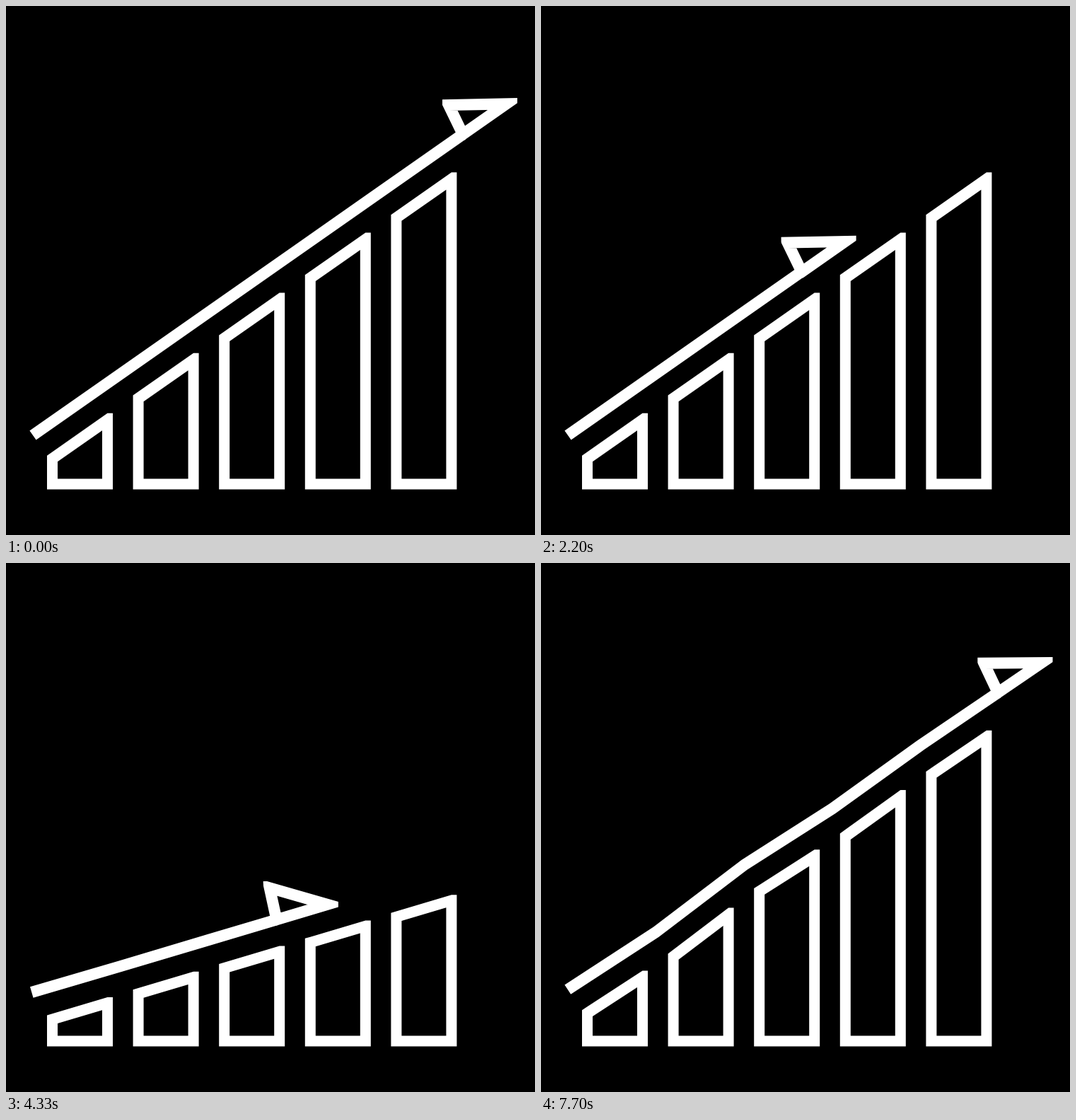
These frames come from a looping animation (748x748 px, 7.73 s). An HTML page with a canvas:

```html
<!DOCTYPE html>
<html lang="en">
<head>
<meta charset="utf-8">
<title>Growth chart</title>
<style>
  html, body { margin: 0; width: 100%; height: 100%; overflow: hidden; background: #000; }
  canvas { display: block; }
</style>
</head>
<body>
<canvas width="748" height="748"></canvas>
<script>
const ctx = document.querySelector('canvas').getContext('2d');
const CYCLE = 3865;

// Trend line: x of its corners, and the heights of its three shapes
const xs = [38, 162, 288, 412, 536, 646];
const straight = xs.map(x => 607 - 0.7 * (x - 38));
const steep = [600, 495, 455, 325, 265, 132];
const jagged = [544, 554, 342, 379.5, 254.5, 212];

const progress = (t, from, to) => Math.min(1, Math.max(0, (t - from) / (to - from)));
const easeIn = u => u * u;
const easeInOut = u => u < 0.5 ? 2 * u * u : 1 - 2 * (1 - u) ** 2;
const mix = (a, b, u) => a.map((v, i) => v + (b[i] - v) * u);

// Share of full height: falls, rests almost flat, then springs up
function riseAt(t) {
  if (t < 865) return 1 - easeInOut(progress(t, 0, 865));
  return 0.02 * progress(t, 865, 1250) + 0.98 * easeInOut(progress(t, 1250, 1650));
}

// Share of the line that is withdrawn
function withdrawnAt(t) {
  return t < 1655 ? easeIn(progress(t, 0, 707)) : 1 - easeIn(progress(t, 1660, 2395));
}

function lineAt(t) {
  if (t < 2640) return straight.map(y => 607 - (607 - y) * riseAt(t));
  if (t < 3065) return mix(straight, steep, easeInOut(progress(t, 2640, 2810)));
  if (t < 3605) return mix(steep, jagged, easeInOut(progress(t, 3065, 3605)));
  return mix(jagged, straight, easeInOut(progress(t, 3605, 3885)));
}

const segment = x => Math.max(0, xs.findLastIndex((v, i) => v <= x && i < 5));
const slope = (ys, i) => (ys[i + 1] - ys[i]) / (xs[i + 1] - xs[i]);
const heightAt = (ys, x, i) => ys[i] + slope(ys, i) * (x - xs[i]);

function trace(points) {
  points.forEach(([x, y], i) => i ? ctx.lineTo(x, y) : ctx.moveTo(x, y));
}

// The top edge follows the line; its upper corner is cut level
function drawBar(ys, i) {
  const half = 7.5, left = 65.5 + 121.6 * i, right = left + 78;
  const s = slope(ys, i);
  const gap = Math.hypot(45, 38 * s);
  const thick = Math.hypot(half, 8.5 * s);
  const top = x => heightAt(ys, x, i) + gap;
  const outer = x => top(x) - thick;
  ctx.beginPath();
  trace([
    [left - half, 676 + half],
    [left - half, Math.max(outer(left - half), outer(left))],
    [left, outer(left)],
    [right, outer(right)],
    [right + half, Math.max(outer(right + half), outer(right))],
    [right + half, 676 + half]
  ]);
  ctx.closePath();
  trace([
    [left + half, 676 - half],
    [left + half, top(left + half) + thick],
    [right - half, top(right - half) + thick],
    [right - half, 676 - half]
  ]);
  ctx.closePath();
  ctx.fill('evenodd');
}

// Triangle whose back edge turns less than its base; sharp ends are cut square
function drawHead(x, y, angle) {
  const back = 0.74 * angle;
  const apex = [x + 46 * Math.sin(back), y - 46 * Math.cos(back)];
  const tip = [x + 75 * Math.cos(angle), y + 75 * Math.sin(angle)];
  const minX = Math.min(x, apex[0]) - 9;
  const minY = Math.min(apex[1], tip[1]) - 9.5;
  const maxY = Math.max(y, tip[1]) + 8.5;
  ctx.save();
  ctx.beginPath();
  ctx.rect(minX, minY, tip[0] + 15.5 - minX, maxY - minY);
  ctx.clip();
  ctx.beginPath();
  trace([[x, y], apex, tip]);
  ctx.closePath();
  ctx.stroke();
  ctx.restore();
}

function drawArrow(ys, withdrawn, rise) {
  const home = 38.5 + 2.3 * rise;
  const endX = 646 + (home - 646) * withdrawn;
  const last = segment(endX);
  const endY = heightAt(ys, endX, last);
  ctx.lineWidth = 16;

  if (withdrawn < 1) {
    const startX = 35 + 3 * Math.min(1, Math.max(0, -slope(ys, 0) / 0.7));
    const corners = xs.slice(1, last + 1).map((x, i) => [x, ys[i + 1]]);
    ctx.beginPath();
    trace([[startX, ys[0]], ...corners, [endX, endY]]);
    ctx.stroke();
  }

  // Near the start the head rides up when flat and down when tilted
  const shift = (9 * rise - 4.5) * withdrawn ** 3;
  drawHead(endX, endY + shift, Math.atan(slope(ys, last)));
}

function draw(now) {
  const t = now % CYCLE;
  const ys = lineAt(t);
  ctx.fillStyle = '#000';
  ctx.fillRect(0, 0, 748, 748);
  ctx.fillStyle = ctx.strokeStyle = '#fff';
  for (let i = 0; i < 5; i++) drawBar(ys, i);
  drawArrow(ys, withdrawnAt(t), riseAt(t));
}

const begin = performance.now();
function tick() {
  draw(performance.now() - begin);
  requestAnimationFrame(tick);
}
tick();
</script>
</body>
</html>
```
